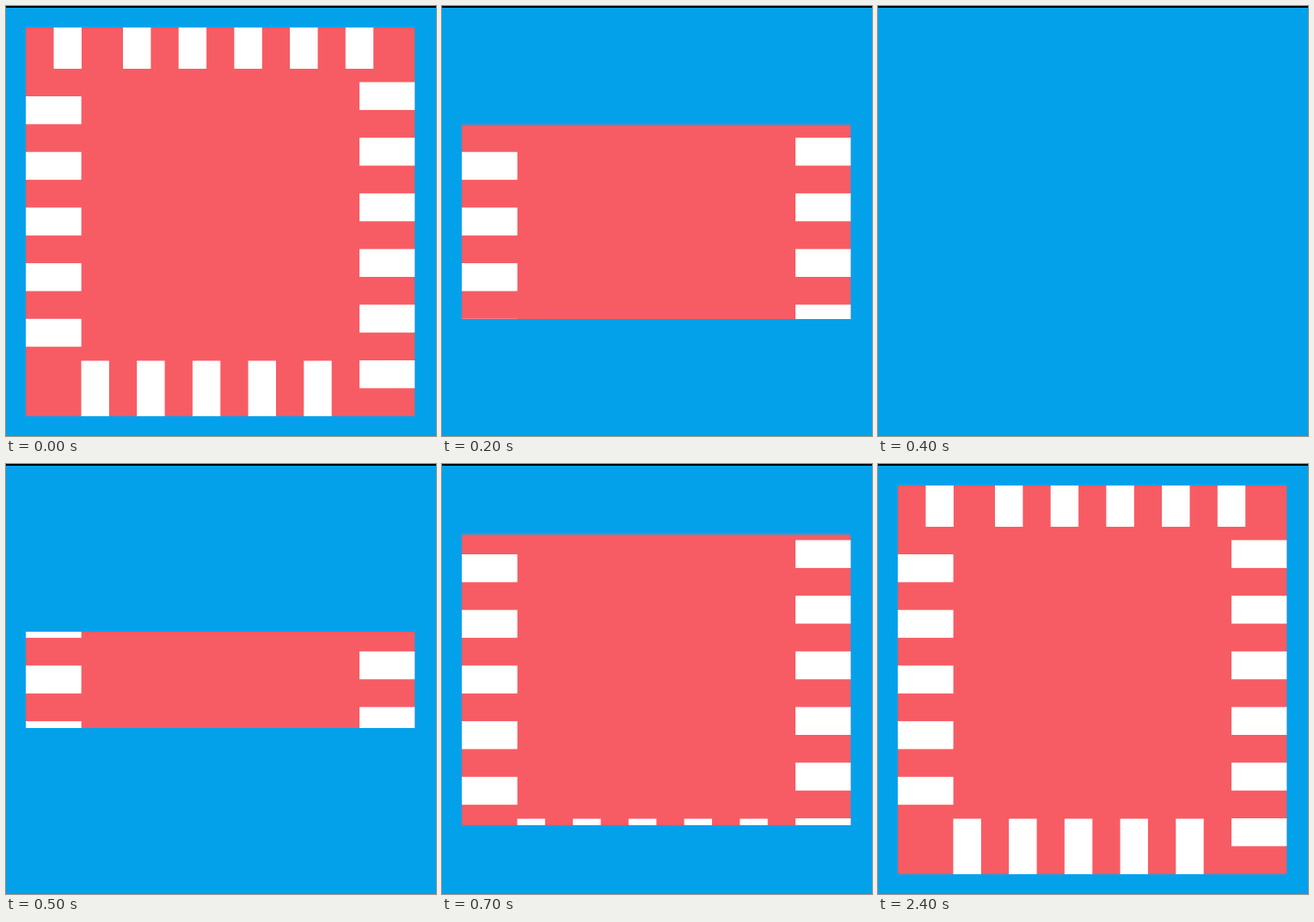
Write an HTML page with a canvas that moves like this. It is 500x500 px and loops after 2500 ms.

```html
<!DOCTYPE html>
<html lang="en">
<head>
<meta charset="utf-8">
<title>Split wipe</title>
<style>
  html, body { margin: 0; width: 100%; height: 100%; overflow: hidden; background: #04a1eb; }
  canvas { display: block; }
</style>
</head>
<body>
<canvas id="stage" width="500" height="500"></canvas>
<script>
const ctx = document.getElementById('stage').getContext('2d');
const LOOP = 2500, STEP = 100, PITCH = 64.7, BAR = 32.4;
const LEFT = 23, TOP = 25, SIZE = 452.5;

function box(color, x, y, w, h) {
  ctx.fillStyle = color;
  ctx.fillRect(x, y, w, h);
}

function row(count, x, y, h) {
  for (let i = 0; i < count; i++) box('#fff', x + i * PITCH, y, BAR, h);
}

function column(count, x, y, w) {
  for (let i = 0; i < count; i++) box('#fff', x, y + i * PITCH, w, BAR);
}

function drawCard() {
  box('#f75c64', LEFT, TOP, SIZE, 452);
  row(1, 55.5, TOP, 48);
  row(5, 136, TOP, 48);
  row(5, 87.5, 412.5, 64.5);
  column(5, LEFT, 105, 64.6);
  column(6, 411, 88.5, 64.5);
}

// The window closes in four steps, then opens again in four.
function draw(time) {
  const step = Math.floor((time % LOOP) / STEP);
  const closed = Math.max(0, 4 - Math.abs(step - 4)) / 4;
  const inset = Math.round(226 * closed);

  box('#04a1eb', 0, 0, 500, 500);
  box('#000', 0, 0, 500, 2);
  if (closed < 1) {
    ctx.save();
    ctx.beginPath();
    ctx.rect(LEFT, TOP + inset, SIZE, 452 - 2 * inset);
    ctx.clip();
    drawCard();
    ctx.restore();
  }
}

const start = performance.now();
function tick() {
  draw(performance.now() - start);
  requestAnimationFrame(tick);
}
tick();
</script>
</body>
</html>
```
